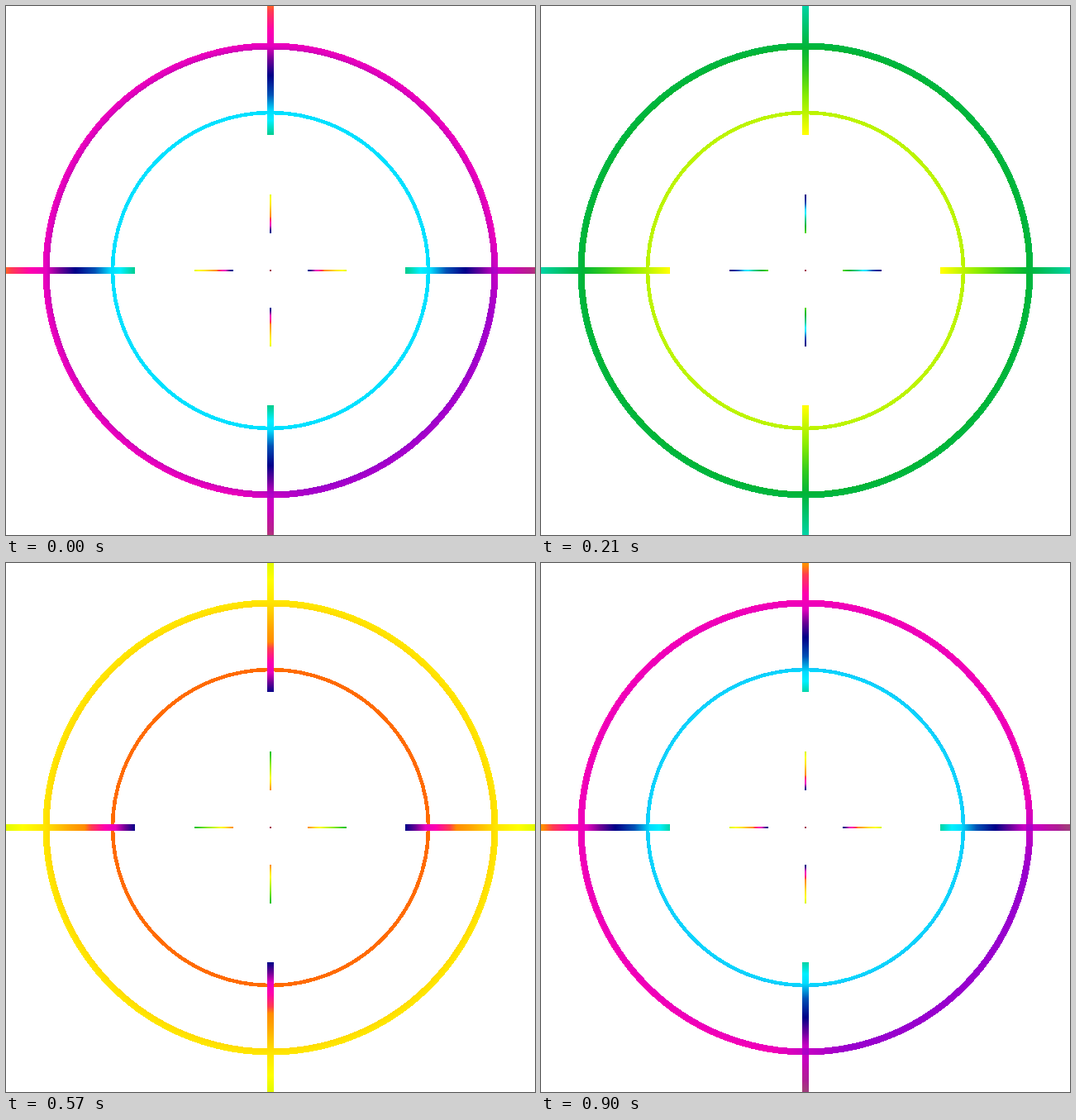
These frames come from a looping animation (640 by 640 pixels, 930 ms). An HTML page:

```html
<!DOCTYPE html>
<html lang="en">
<head>
<meta charset="utf-8">
<title>Rainbow crosshair</title>
<style>
  html, body { margin: 0; width: 100%; height: 100%; overflow: hidden; background: #fff; }
  svg { display: block; width: 640px; height: 640px; fill: none; shape-rendering: crispEdges; }
  .full { stroke: url(#full); }
  .soft { stroke: url(#soft); }
  .tint { stroke: url(#violet); }
</style>
</head>
<body>
<svg viewBox="0 0 640 640">
  <defs>
    <radialGradient id="full" gradientUnits="userSpaceOnUse" cx="320" cy="320" r="708"></radialGradient>
    <radialGradient id="soft" gradientUnits="userSpaceOnUse" cx="320" cy="320" r="708"></radialGradient>
    <linearGradient id="violet" gradientUnits="userSpaceOnUse" x1="0" y1="0" x2="640" y2="640">
      <stop offset="0.68" stop-color="#5a00dc" stop-opacity="0"/>
      <stop offset="0.75" stop-color="#5a00dc" stop-opacity="0.7"/>
    </linearGradient>
  </defs>
  <circle class="soft" cx="320" cy="320" r="191" stroke-width="4.5"/>
  <g id="frame" class="full">
    <circle cx="320" cy="320" r="271.5" stroke-width="8"/>
    <path d="M0 320H156M483 320H640M320 0V156M320 483V640" stroke-width="8"/>
  </g>
  <path class="full" d="M228 320H275M365 320H412M320 228V275M320 365V412" stroke-width="2"/>
  <path d="M319 320H321" stroke="#a01048" stroke-width="2"/>
</svg>
<script>
const LOOP = 930, STEP = 30, NAVY = 236, ZOOM = 5, EDGE = 3;
const el = id => document.getElementById(id);

// One spectrum, by radius relative to the navy band; it repeats at every fivefold radius.
const spectrum = {
  0.6: '#00b437', 0.7: '#00cf96', 0.77: '#00f0ff', 0.82: '#00dcff',
  0.9: '#0052b6', 1: '#000087', 1.08: '#6e0096', 1.15: '#e600be',
  1.23: '#ff00af', 1.33: '#ff3c50', 1.38: '#ff8c00', 1.48: '#ffa500',
  1.67: '#ffe400', 1.84: '#ffff00', 2.34: '#8aec00', 2.7: '#32ca1e', 3: '#00b437'
};

// The inner ring passes from orange to cyan through a pale violet.
const isDark = q => q > 0.85 && q < 1.36;
const softStops = Object.entries(spectrum).filter(([q]) => !isDark(q))
  .concat([[0.93, '#826edc'], [1.16, '#ff6900']]);

function fill(id, stops) {
  const rows = [ZOOM ** -2, ZOOM ** -1, 1]
    .flatMap(k => stops.map(([q, c]) => [q * k / EDGE, c]))
    .sort((a, b) => a[0] - b[0]);
  el(id).innerHTML = rows.map(([o, c]) => `<stop offset="${o}" stop-color="${c}"/>`).join('');
}

fill('full', Object.entries(spectrum));
fill('soft', softStops);

// Violet cast on the lower right while the reds pass.
const cast = el('frame').cloneNode(true);
cast.removeAttribute('id');
cast.setAttribute('class', 'tint');
el('frame').after(cast);

function draw(t) {
  const r = EDGE * NAVY * (1 + (ZOOM - 1) * t / LOOP);
  el('full').setAttribute('r', r);
  el('soft').setAttribute('r', r);
  const sinceRed = (t + 60 + LOOP / 2) % LOOP - LOOP / 2;
  cast.setAttribute('opacity', Math.max(0, 1 - Math.abs(sinceRed) / 180));
}

const start = performance.now();
function tick() {
  const t = (performance.now() - start) % LOOP;
  draw(Math.floor(t / STEP) * STEP);
  requestAnimationFrame(tick);
}
tick();
</script>
</body>
</html>
```
